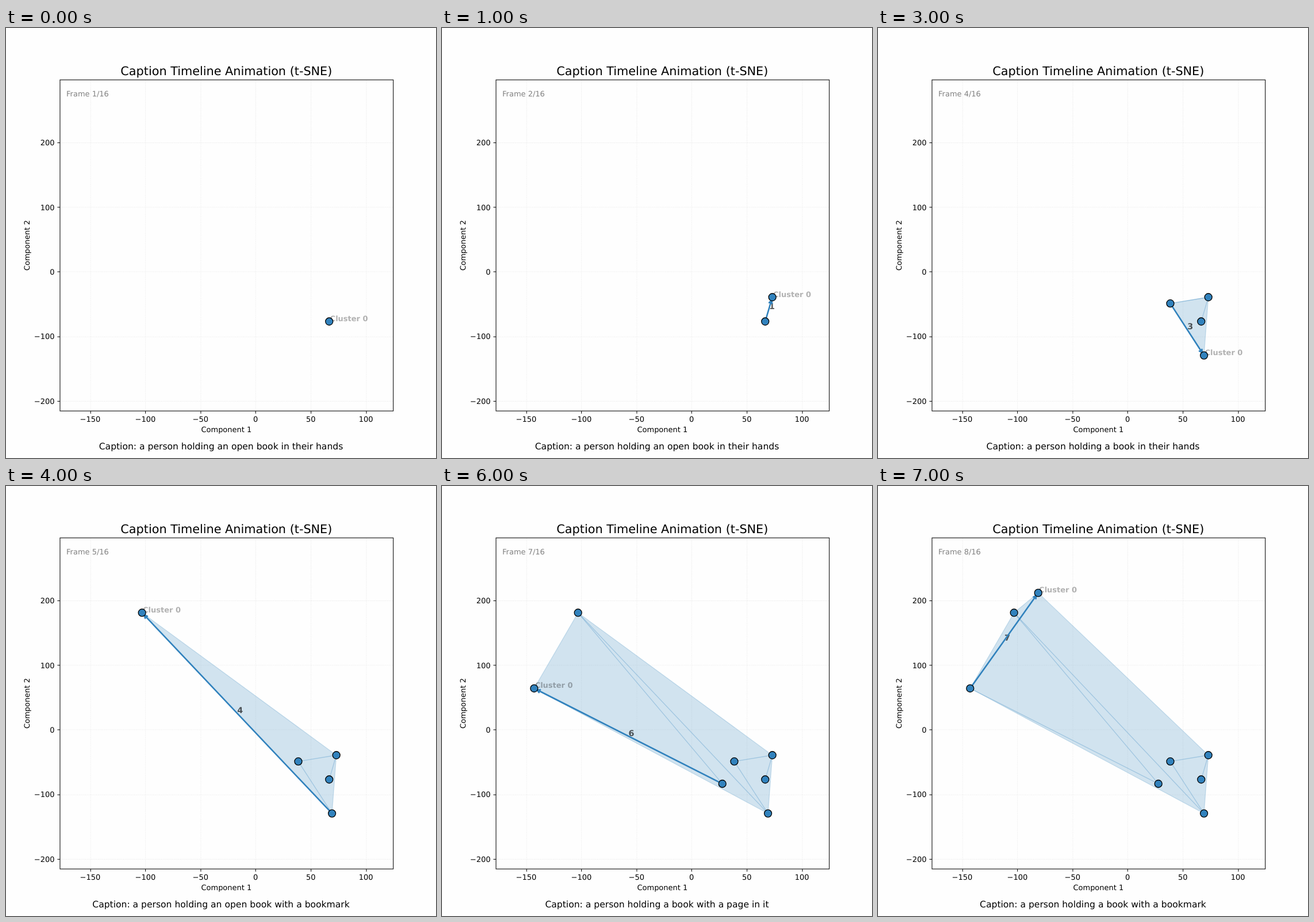
An HTML page for the animation above (8 s loop, 748 by 748 pixels).

```html
<!DOCTYPE html>
<html lang="en">
<head>
<meta charset="utf-8">
<title>Caption Timeline Animation</title>
<style>
  html, body { margin: 0; width: 100%; height: 100%; overflow: hidden; background: #fefefe; }
  svg { display: block; width: 748px; height: 748px; }
  text { font: 13.89px "DejaVu Sans", sans-serif; text-rendering: geometricPrecision; }
  .mid { text-anchor: middle; }
  .end { text-anchor: end; }
  .title { font-size: 22.22px; }
  .caption { font-size: 16.67px; }
  .count { fill: #808080; }
  .cluster { font-weight: bold; fill-opacity: .3; }
  .step { font-weight: bold; font-size: 15.28px; fill-opacity: .65; }
  .grid { stroke: #e7e7e7; stroke-width: 1.11; stroke-dasharray: 1.11 1.83; }
  .axis { stroke: #000; stroke-width: 1.11; fill: none; }
  .hull { fill: #1f77b4; stroke: #1f77b4; stroke-width: 1.39; fill-opacity: .2; stroke-opacity: .2; }
  .trail { stroke: #3182bd; stroke-width: 1.39; stroke-opacity: .3; }
  .arrow { stroke: #3182bd; stroke-width: 2.78; fill: none; stroke-linecap: round; stroke-linejoin: round; }
  .dot { fill: #3182bd; stroke: #000; stroke-width: 1.39; }
</style>
</head>
<body>
<svg viewBox="0 0 800 800">
  <g id="axes"></g>
  <g id="plot"></g>
</svg>
<script>
const STEP_MS = 1000;
const HANDS = 'a person holding an open book in their hands';
const steps = [
  { x: 601.3, y: 546, caption: HANDS },
  { x: 614.6, y: 500.8, caption: HANDS },
  { x: 543.8, y: 512.5, caption: HANDS },
  { x: 606.5, y: 609.2, caption: 'a person holding a book in their hands' },
  { x: 253.1, y: 235.8, caption: 'a person holding an open book with a bookmark' },
  { x: 521.6, y: 554, caption: HANDS },
  { x: 171.4, y: 376.5, caption: 'a person holding a book with a page in it' },
  { x: 298.1, y: 198.8, caption: 'a person holding a book with a bookmark' }
];

const axes = document.getElementById('axes');
const plot = document.getElementById('plot');
const text = (cls, x, y, str, extra = '') => `<text class="${cls}" x="${x}" y="${y}" ${extra}>${str}</text>`;
const line = (cls, x1, y1, x2, y2) => `<line class="${cls}" x1="${x1}" y1="${y1}" x2="${x2}" y2="${y2}"/>`;
const signed = v => String(v).replace('-', '\u2212');
const snap = v => Math.round(v) + .5;

function drawAxes() {
  const left = 100.5, right = 720.5, top = 96.5, bottom = 712.5, tick = 4.86;
  let out = '';
  for (let v = -150; v <= 100; v += 50) {
    const x = 464.4 + v * 2.052, sx = snap(x);
    out += line('grid', sx, bottom, sx, top) + line('axis', sx, bottom, sx, bottom + tick)
      + text('mid', x, 733, signed(v));
  }
  for (let v = -200; v <= 200; v += 100) {
    const y = 453.4 - v * 1.202, sy = snap(y);
    out += line('grid', left, sy, right, sy) + line('axis', left - tick, sy, left, sy)
      + text('end', 90.3, Math.round(y + 5.3), signed(v));
  }
  out += `<rect class="axis" x="${left}" y="${top}" width="${right - left}" height="${bottom - top}"/>`
    + text('mid title', 410, 88, 'Caption Timeline Animation (t-SNE)')
    + text('mid', 410, 752, 'Component 1')
    + text('mid', 0, 0, 'Component 2', 'transform="translate(44 404.5) rotate(-90)"');
  axes.innerHTML = out;
}

function hull(points) {
  const sorted = [...points].sort((a, b) => a.x - b.x || a.y - b.y);
  const cross = (o, a, b) => (a.x - o.x) * (b.y - o.y) - (a.y - o.y) * (b.x - o.x);
  const chain = list => {
    const side = [];
    for (const p of list) {
      while (side.length > 1 && cross(side.at(-2), side.at(-1), p) <= 0) side.pop();
      side.push(p);
    }
    return side.slice(0, -1);
  };
  return [...chain(sorted), ...chain(sorted.reverse())];
}

function arrow(a, b) {
  const len = Math.hypot(b.x - a.x, b.y - a.y);
  const ux = (b.x - a.x) / len, uy = (b.y - a.y) / len;
  const at = (back, off) => `${b.x - ux * back - uy * off} ${b.y - uy * back + ux * off}`;
  const gap = 2.78, tip = 5.9, wing = tip + 5.6;
  return `<path class="arrow" d="M${at(len - gap, 0)}L${at(tip, 0)}M${at(wing, 2.8)}L${at(tip, 0)}L${at(wing, -2.8)}"/>`;
}

function drawStep(n) {
  const seen = steps.slice(0, n + 1);
  const last = steps[n], prev = steps[n - 1];
  let out = text('count', 112.4, 127, `Frame ${n + 1}/16`)
    + text('mid caption', 400, 784, 'Caption: ' + last.caption);
  if (n > 1) {
    out += `<polygon class="hull" points="${hull(seen).map(p => `${p.x},${p.y}`).join(' ')}"/>`;
  }
  for (let i = 1; i < n; i++) {
    out += line('trail', steps[i - 1].x, steps[i - 1].y, steps[i].x, steps[i].y);
  }
  out += text('cluster', last.x + 1.5, last.y - .7, 'Cluster 0');
  if (prev) {
    out += text('step', (prev.x + last.x) / 2 + .5, (prev.y + last.y) / 2, n) + arrow(prev, last);
  }
  out += seen.map(p => `<circle class="dot" cx="${p.x}" cy="${p.y}" r="6.94"/>`).join('');
  plot.innerHTML = out;
}

let shown = -1;
function tick() {
  const n = Math.floor(performance.now() / STEP_MS) % steps.length;
  if (n !== shown) drawStep(shown = n);
  requestAnimationFrame(tick);
}

drawAxes();
tick();
</script>
</body>
</html>
```
